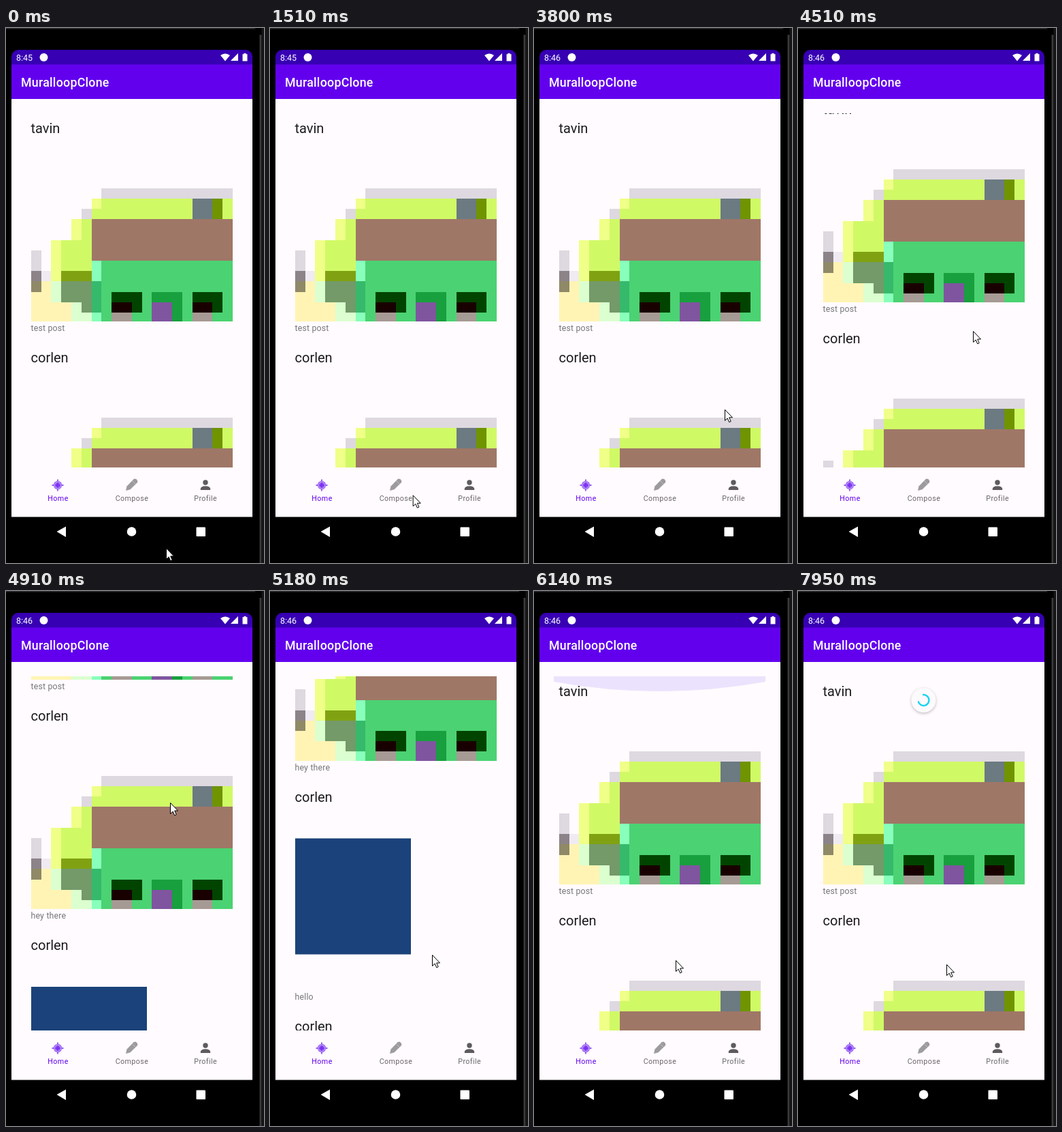
An HTML page with a canvas for the animation above (8000 ms loop, 379 by 784 pixels).

```html
<!DOCTYPE html>
<html lang="en">
<head>
<meta charset="utf-8">
<style>
html, body { margin: 0; width: 100%; height: 100%; overflow: hidden; background: #000; }
canvas { display: block; }
</style>
</head>
<body>
<canvas id="stage" width="379" height="784"></canvas>
<script>
const ctx = document.getElementById('stage').getContext('2d');
const LOOP = 8000, FIRST_TICK = 1236, TICK = 135.9;
const PAPER = '#fffbfe', PURPLE = '#6200ee', PITCH = 336;

// Keyframes: [tick, value, ...], linear between them
const CURSOR = [[0, 221, 693], [3, 204, 680], [7, 210, 689], [11, 299, 632], [13, 303, 586],
  [15, 295, 632], [20, 270, 510], [23, 258, 478], [24, 257, 444], [26, 246, 300], [27, 241, 310],
  [29, 238, 533], [32, 243, 560], [34, 247, 690], [36, 208, 541], [39, 216, 204], [41, 187, 174],
  [42, 187, 174], [46, 215, 500], [47, 218, 547]];
const SCROLL = [[23, 0], [24, 28], [26, 170], [27, 300], [28, 420], [29, 517.5], [30, 600],
  [31, 670], [32, 712], [33, 700], [34, 636.5], [35, 260], [36, 0]];
const GLOW = [[35, 0], [36, 1], [40, 0]];
const SPINNER = [[42, 101, 0], [44, 140, 1.2], [45, 185, 3], [46, 210, 4.5], [47, 217, 5],
  [48, 175, 4.8], [49, 160, 4.7]];

const POSTS = [['tavin', 'test post'], ['corlen', 'hey there'], ['corlen', 'hello'], ['corlen', '']];

// Pixel picture: colour, then column, row, width, height in cells
const CELLS = [
  ['#ded8e0', 7, 0, 13, 1], ['#d0f966', 6, 1, 14, 2], ['#f0ff88', 6, 1, 1, 1],
  ['#6c7a82', 16, 1, 2, 2], ['#6f9400', 18, 1, 1, 2], ['#ded8e0', 5, 2, 1, 1],
  ['#f0ff88', 4, 3, 1, 2], ['#d0f966', 5, 3, 1, 2], ['#9f7767', 6, 3, 14, 4],
  ['#f0ff88', 2, 5, 1, 4], ['#d0f966', 3, 5, 3, 3], ['#ded8e0', 0, 6, 1, 2],
  ['#4bd272', 7, 7, 13, 6], ['#88ffbb', 6, 7, 1, 6], ['#8c8388', 0, 8, 1, 1],
  ['#f0ebf2', 1, 8, 1, 1], ['#80a212', 3, 8, 3, 1], ['#fff4b4', 0, 9, 4, 4],
  ['#8f8968', 0, 9, 1, 1], ['#dcffd0', 2, 9, 1, 2], ['#739a68', 3, 9, 3, 2],
  ['#36b96b', 6, 9, 1, 3], ['#dcffd0', 4, 11, 2, 2], ['#739a68', 5, 11, 1, 1],
  ['#004400', 8, 10, 3, 2], ['#004400', 16, 10, 3, 2], ['#189f3e', 12, 10, 3, 3],
  ['#190000', 8, 11, 2, 1], ['#190000', 16, 11, 2, 1], ['#7f559f', 12, 11, 2, 2],
  ['#a69a94', 8, 12, 2, 1], ['#a69a94', 16, 12, 2, 1]];

function track(keys, tick) {
  if (tick <= keys[0][0]) return keys[0].slice(1);
  const next = keys.findIndex(key => key[0] > tick);
  if (next < 0) return keys[keys.length - 1].slice(1);
  const a = keys[next - 1], b = keys[next], p = (tick - a[0]) / (b[0] - a[0]);
  return a.slice(1).map((v, i) => v + (b[i + 1] - v) * p);
}

function rect(color, x, y, w, h) {
  ctx.fillStyle = color;
  ctx.fillRect(x, y, w, h);
}

function disc(color, x, y, r) {
  ctx.fillStyle = color;
  ctx.beginPath();
  ctx.arc(x, y, r, 0, 7);
  ctx.fill();
}

function shape(color, path) {
  ctx.fillStyle = color;
  ctx.fill(new Path2D(path));
}

function text(str, x, y, size, color, spacing = 0, weight = 400, align = 'left') {
  ctx.font = `${weight} ${size}px Roboto, sans-serif`;
  ctx.letterSpacing = spacing + 'px';
  ctx.textAlign = align;
  ctx.fillStyle = color;
  ctx.fillText(str, x, y);
}

function clipped(x, y, w, h, draw) {
  ctx.save();
  ctx.beginPath();
  ctx.rect(x, y, w, h);
  ctx.clip();
  draw();
  ctx.restore();
}

function pixelPicture(top) {
  const colX = c => Math.round(36.8 + c * 14.8);
  const rowY = r => Math.round(top + Math.min(195, r * 15.15));
  for (const [color, c, r, w, h] of CELLS)
    rect(color, colX(c), rowY(r), colX(c + w) - colX(c), rowY(r + h) - rowY(r));
}

function feed(scroll) {
  POSTS.forEach(([user, caption], i) => {
    const y = i * PITCH - scroll;
    if (y > 540 || y < -340) return;
    text(user, 36.5, y + 154, 20, '#1d1b1e');
    if (i < 2) pixelPicture(y + 235);
    else rect('#1b427a', 37, y + 208, 170, 170);
    text(caption, 36.5, y + 444, 12.3, '#767578', 0.2);
  });
}

function overscrollGlow(amount) {
  if (!amount) return;
  ctx.globalAlpha = amount;
  const edge = 125 + 8 * amount, dip = 125 + 36 * amount;
  shape('#ebe3fd', `M29 125H340V${edge}Q184.5 ${dip} 29 ${edge}Z`);
  ctx.globalAlpha = 1;
}

function spinner(tick) {
  if (tick < 43) return;
  const [y, sweep] = track(SPINNER, tick);
  ctx.save();
  ctx.shadowColor = 'rgba(0,0,0,.25)';
  ctx.shadowBlur = 4;
  ctx.shadowOffsetY = 1.5;
  disc('#fcfafc', 184.5, y, 18);
  ctx.restore();
  const start = -1.75 + (tick - 49) * 0.5;
  ctx.strokeStyle = '#1ad3f2';
  ctx.lineWidth = 2.4;
  ctx.globalAlpha = Math.min(1, 0.3 + sweep / 6);
  ctx.beginPath();
  ctx.arc(184.5, y, 8, start, start + sweep);
  ctx.stroke();
  ctx.globalAlpha = 1;
}

function statusBar(clock) {
  text(clock, 15, 47.5, 12.5, '#fff');
  disc('#fff', 55.5, 43, 6);
  shape('#fff', 'M315 40Q322 35 329 40L322 48.5Z');
  shape('#fff', 'M341 37V48H330Z');
  shape('#fff', 'M349.5 37H352.5V38.3H354.5V48.5H347.5V38.3H349.5Z');
}

function tabs() {
  disc('#985ff3', 76, 670, 6.2);
  rect('#985ff3', 75, 661.5, 2, 17);
  rect('#985ff3', 67.5, 669, 17, 2);
  ctx.strokeStyle = '#d5bffb';
  ctx.lineWidth = 0.8;
  ctx.beginPath();
  ctx.arc(76, 670, 4.7, 0, 7);
  ctx.stroke();
  shape('#7a32f0', 'M76 665.5L77.5 668.5 80.5 670 77.5 671.5 76 674.5 74.5 671.5 71.5 670 74.5 668.5Z');

  shape('#9d9b9d', 'M176 678L177.5 671.5 187.5 661.2Q189.5 659.5 191.8 661.5T193 666L182.5 676.2Z');
  ctx.strokeStyle = '#c9c7c9';
  ctx.beginPath();
  ctx.moveTo(185.5, 663.5);
  ctx.lineTo(190.5, 668.5);
  ctx.stroke();

  disc('#5d5b5d', 293, 666, 3.7);
  shape('#5d5b5d', 'M285.8 677V675Q286.5 671.5 293 671.3 299.5 671.5 300.2 675V677Z');

  text('Home', 76.5, 693, 10.7, PURPLE, 0.43, 400, 'center');
  text('Compose', 185, 693, 10.7, '#69676a', 0.43, 400, 'center');
  text('Profile', 293.2, 693, 10.7, '#69676a', 0.43, 400, 'center');
}

function phone() {
  rect('#000', 0, 0, 379, 784);
  rect('#2c2c2e', 0, 0, 366, 1.5);
  rect('#3b3b3d', 372.5, 10, 3, 774);
  rect('#151516', 375.5, 0, 3.5, 784);
  ctx.save();
  ctx.beginPath();
  ctx.roundRect(8, 32, 354, 684.5, [10, 10, 0, 0]);
  ctx.clip();
  rect('#3700b3', 8, 32, 354, 22);
  rect(PURPLE, 8, 53.5, 354, 50.5);
  rect(PAPER, 8, 104, 354, 613);
  ctx.restore();
  text('MuralloopClone', 22, 86, 17.8, '#fff', 0.25, 500);
  shape('#fff', 'M74.5 738L88 730.5V746Z');
  disc('#fff', 184.5, 738, 6.8);
  ctx.fillStyle = '#fff';
  ctx.beginPath();
  ctx.roundRect(279.5, 731.5, 13.5, 13.5, 1);
  ctx.fill();
}

function pointer(x, y) {
  ctx.save();
  ctx.translate(x + 0.5, y + 0.5);
  const arrow = new Path2D('M0 0V16L3.7 12.6 6.2 18.3 8.7 17.2 6.2 11.5H11Z');
  ctx.fillStyle = '#fff';
  ctx.fill(arrow);
  ctx.strokeStyle = '#000';
  ctx.lineWidth = 1;
  ctx.stroke(arrow);
  ctx.restore();
}

function render(now) {
  const t = now % LOOP;
  const tick = Math.floor((t - FIRST_TICK) / TICK);
  phone();
  statusBar(tick < 16 ? '8:45' : '8:46');
  clipped(29, 125, 311, 519, () => {
    feed(track(SCROLL, tick)[0]);
    overscrollGlow(track(GLOW, tick)[0]);
  });
  clipped(29, 119, 311, 525, () => spinner(tick));
  tabs();
  if (t < 120) pointer(235, 762);
  else if (t < 250) pointer(229, 772);
  else if (tick >= 0) pointer(...track(CURSOR, tick));
  requestAnimationFrame(() => render(performance.now()));
}
render(0);
</script>
</body>
</html>
```
